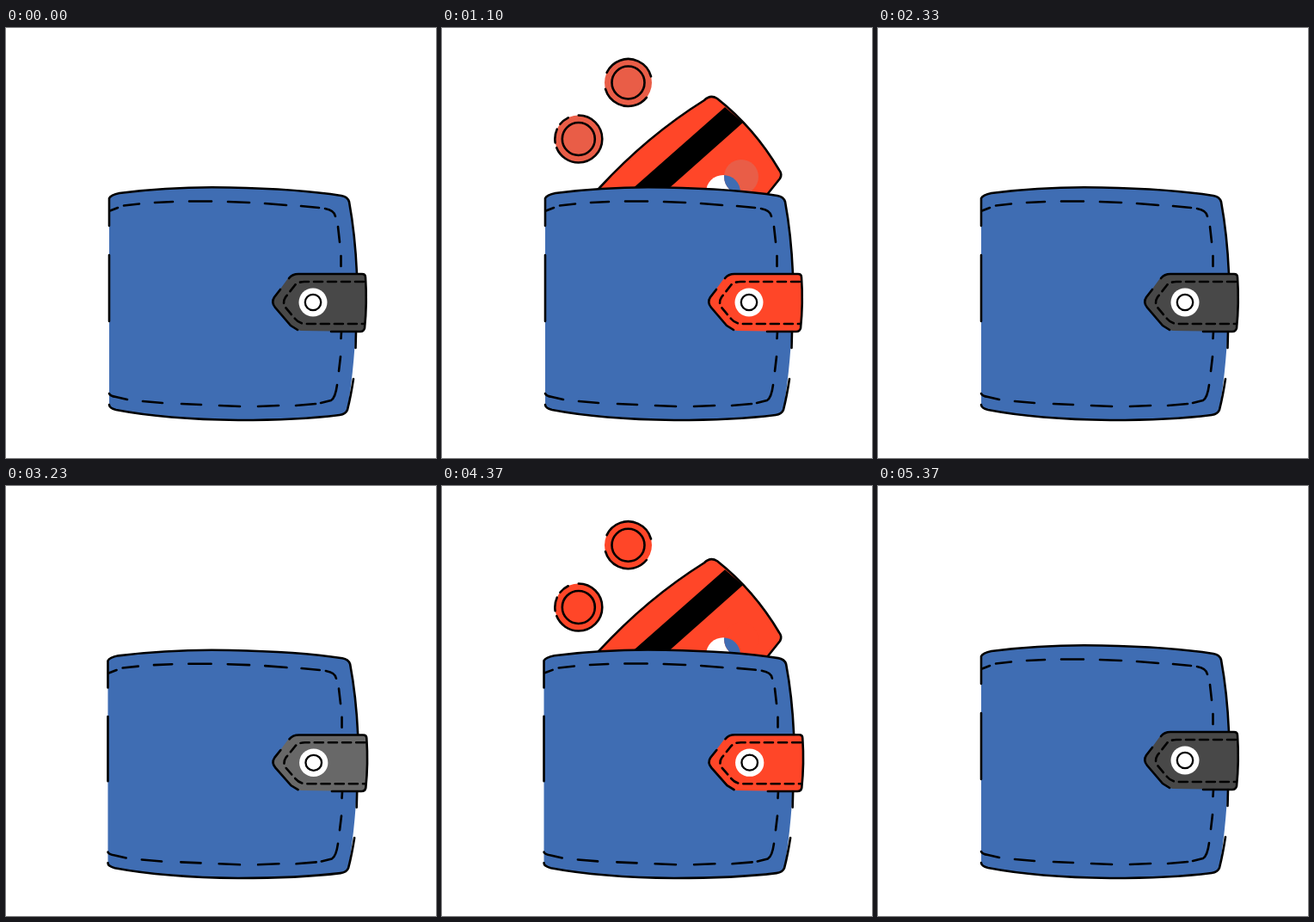
These frames come from a looping animation (500x500 px, 6.03 s). An HTML page:

```html
<!DOCTYPE html>
<html lang="en">
<head>
<meta charset="utf-8">
<title>Wallet</title>
<style>
html, body { margin: 0; width: 100%; height: 100%; overflow: hidden; background: #fff; }
svg { display: block; width: 100vw; height: 100vh; }
.line { fill: none; stroke: #000; stroke-width: 2.6; stroke-linecap: round; stroke-linejoin: round; }
.red { fill: #ff4628; }
</style>
</head>
<body>
<svg viewBox="0 0 500 500">
  <defs>
    <clipPath id="cardClip"><path d="M152 225L183 191Q238 131 305 89Q312 82 320 87Q363 121 392 170Q396 175 393 180L357 225Z"/></clipPath>
    <clipPath id="discClip"><circle cx="327" cy="196" r="20"/></clipPath>
    <clipPath id="above"><path d="M0 0H500V230H0Z"/></clipPath>
  </defs>

  <g id="items" clip-path="url(#above)">
    <g id="card">
      <g clip-path="url(#cardClip)">
        <path class="red" d="M100 60H420V240H100Z"/>
        <path d="M329 97L350 115L243 210L202 209Z"/>
        <circle cx="327" cy="196" r="20" fill="#fff"/>
        <circle class="tint" cx="348" cy="178" r="20"/>
        <circle cx="348" cy="178" r="20" fill="#3f6db3" clip-path="url(#discClip)"/>
      </g>
      <path class="line" d="M152 225L183 191Q238 131 305 89Q312 82 320 87Q363 121 392 170Q396 175 393 180L357 225"/>
    </g>
    <g id="coinA">
      <circle class="tint" r="27.5"/>
      <circle class="line" r="27.5" stroke-dasharray="67 26 60 20" transform="rotate(-155)"/>
      <circle class="line" r="19"/>
    </g>
    <g id="coinB">
      <circle class="tint" r="27.5"/>
      <circle class="line" r="27.5" stroke-dasharray="119 6 16 7 12 13" transform="rotate(-90)"/>
      <circle class="line" r="19"/>
    </g>
  </g>

  <g id="wallet">
    <path fill="#3f6db3" d="M120 198Q122 194 132 192Q195 184 260 185.5Q340 187 390 195Q397 196 399 202Q408 245 408 320Q406 390 397 444Q395 449 388 450Q340 456 270 456Q185 455 128 444Q120 442 120 438Z"/>
    <path class="line" d="M120 230V198Q122 194 132 192Q195 184 260 185.5Q340 187 390 195Q397 196 399 202Q406 240 408 286M120 264V341M407 353L406.5 372M404 408Q401 428 397 444Q395 449 388 450Q340 456 270 456Q185 455 128 444Q120 442 120 438"/>
    <path class="line" d="M121 212.5L130 209M137 206.5L155 204.5M173 203L194 202M213 201.5H239M258 202L283 203M301 204L326 206M343 207L364 209M371 210Q382 212 383 219M386 231L388 249M389.5 265V277M390 353L389.5 361M389 382L387 399M385 415Q383 430 378 433L366 436M360 437L337 439M317 439L293 440M272 440L248 439M227 438L204 437M182 436L159 434M141 432L128 429Q121 428 120 425"/>
    <path id="clasp" d="M310 319Q310 316 312 313L328 291Q332 286 340 286L414 286Q418 286 418 290Q420 320 417 349Q416 353 412 353L343 352Q336 351 331 346L313 325Q310 322 310 319Z"/>
    <path class="line" d="M319 304L312 313Q308 319 313 325L331 346L339 351M378 353H412Q416 353 417 349Q420 320 418 290Q418 286 414 286L340 286Q333 286 329 291"/>
    <path class="line" stroke-dasharray="10 6" d="M416 295H347Q340 295 336 299L325 313Q321 319 325 325L336 338Q341 344 349 344H416"/>
    <circle cx="357" cy="319" r="16.5" fill="#fff"/>
    <circle class="line" cx="357" cy="319" r="9.2" style="stroke-width:2.3"/>
  </g>
</svg>
<script>
const el = id => document.getElementById(id);
const LOOP = 6030, HALF = 3000;
const smooth = x => x * x * (3 - 2 * x);
const easeOut = x => 1 - (1 - x) ** 3;
const easeIn = x => x * x;
const span = (t, a, b, ease = smooth) => ease(Math.min(1, Math.max(0, (t - a) / (b - a))));
const move = (id, x, y) => el(id).setAttribute('transform', `translate(${x} ${y})`);

function draw(time) {
  const second = time >= HALF;
  const t = second ? time - HALF : time;

  // Crouch, spring open, then absorb the landing.
  const squash = span(t, 20, 560) - span(t, 760, 930)
    + span(t, 1322, 1450) - span(t, 1560, 1890);
  const sx = 1 + .028 * squash, sy = 1 - .06 * squash;
  el('wallet').setAttribute('transform',
    `translate(${281 * (1 - sx)} ${456 * (1 - sy)}) scale(${sx} ${sy})`);

  el('items').style.display = t > 790 && t < 1720 ? '' : 'none';
  const sag = 16 * squash;
  const drop = (depth, up, top, down, end) =>
    sag + depth * (1 - span(t, up, top, easeOut) + span(t, down, end, easeIn));
  move('card', 0, -5 + drop(150, 790, 1010, 1420, 1680));
  move('coinA', 216.5, 63.5 + drop(180, 810, 1060, 1410, 1670));
  move('coinB', 158.8, 129 + drop(110, 800, 1030, 1309, 1560));

  const tint = second ? '#ff4628' : '#e95d47';
  document.querySelectorAll('.tint').forEach(e => e.style.fill = tint);
  const grey = second && t > 30 && t < 1900 ? '#686868' : '#484848';
  el('clasp').style.fill = t > 850 && t < 1650 ? '#ff4628' : grey;
}

function tick(now) {
  draw(now % LOOP);
  requestAnimationFrame(tick);
}
draw(0);
requestAnimationFrame(tick);
</script>
</body>
</html>
```
